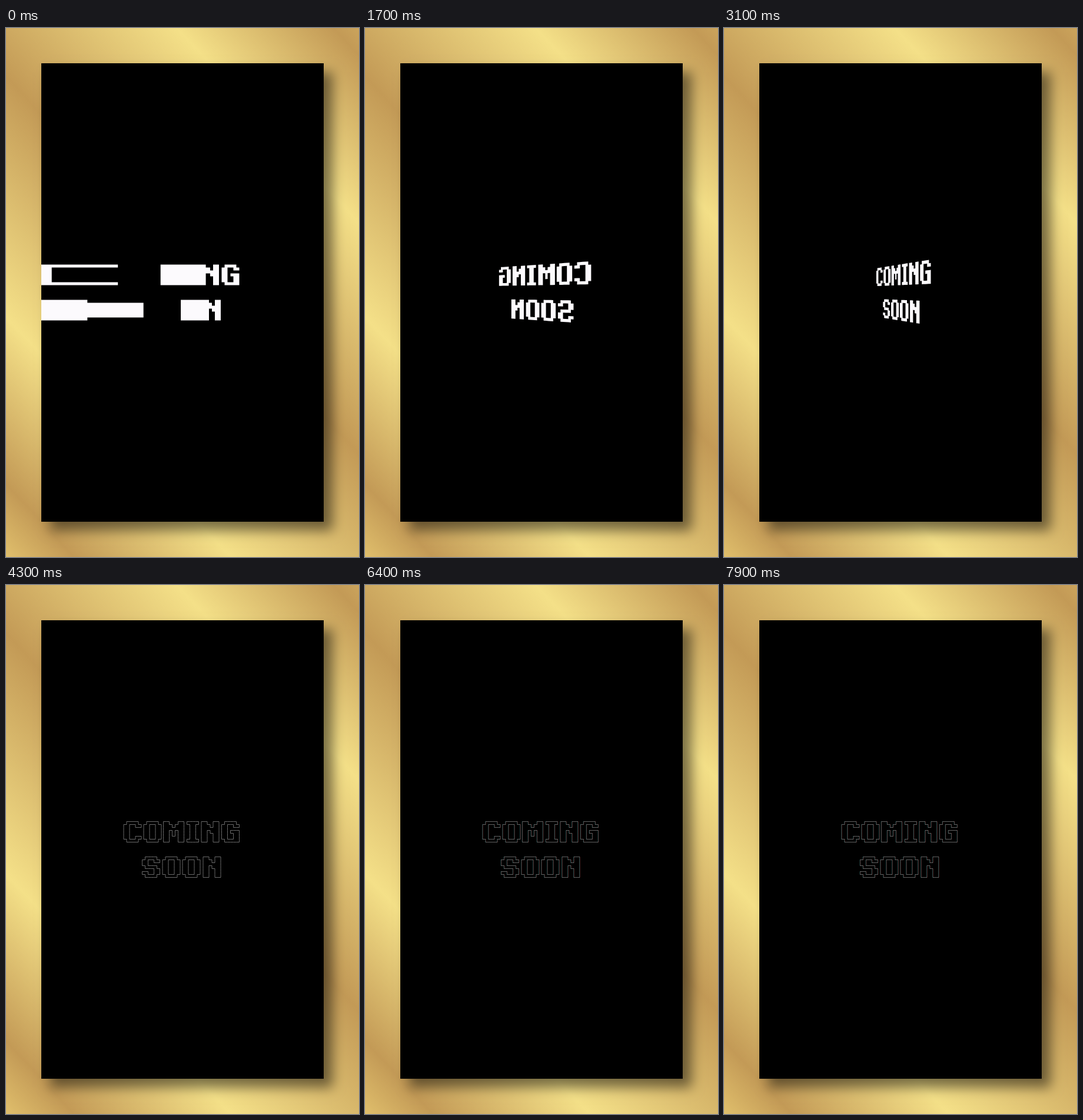
Write an HTML page with a canvas that moves like this. It is 600 by 900 pixels and loops after 8 s.

```html
<!DOCTYPE html>
<html lang="en">
<head>
<meta charset="utf-8">
<title>Coming soon</title>
<style>
  html, body { margin: 0; width: 100%; height: 100%; overflow: hidden; background: #000; }
  canvas { display: block; width: 600px; height: 900px; }
</style>
</head>
<body>
<canvas id="stage" width="600" height="900" role="img" aria-label="COMING SOON"></canvas>
<script>
const ctx = document.getElementById('stage').getContext('2d');
const LOOP = 8000, STEP = 100, CELL = 5;
const CX = 298, CY = 450, DEPTH = 570;
const WHITE = '#fcfafd';

const GLYPHS = {
  C: '.####. ##..## ##.... ##.... ##.... ##..## .####.',
  O: '.####. ##..## ##..## ##..## ##..## ##..## .####.',
  M: '##...## ###.### ####### ##.#.## ##.#.## ##...## ##...##',
  I: '#### .##. .##. .##. .##. .##. ####',
  N: '##..## ###.## ###### ##.### ##..## ##..## ##..##',
  G: '.####. ##..## ##.... ##.### ##..## ##..## .#####',
  S: '.####. ##..## ##.... .####. ....## ##..## .####.'
};
const LINES = [
  { text: 'COMING', y: 402.5, xs: [200, 234, 267.5, 307.5, 332, 366.5] },
  { text: 'SOON', y: 462.5, xs: [231.5, 266, 300, 335] }
];

// Filled cells and the border edges of every letter
const cells = [], edges = [];
for (const line of LINES) {
  [...line.text].forEach((ch, i) => {
    const rows = GLYPHS[ch].split(' ');
    const on = (r, c) => (rows[r] || '')[c] === '#';
    rows.forEach((row, r) => {
      for (let c = 0; c < row.length; c++) {
        if (!on(r, c)) continue;
        const x = line.xs[i] + c * CELL, y = line.y + r * CELL;
        const X = x + CELL, Y = y + CELL;
        cells.push([x, y, X, Y]);
        if (!on(r - 1, c)) edges.push([x, y, X, y]);
        if (!on(r + 1, c)) edges.push([x, Y, X, Y]);
        if (!on(r, c - 1)) edges.push([x, y, x, Y]);
        if (!on(r, c + 1)) edges.push([X, y, X, Y]);
      }
    });
  });
}

const clamp = (v, lo = 0, hi = 1) => Math.min(hi, Math.max(lo, v));
const flat = (x, y) => [x, y];

// Everything left of the edge is dragged off to the left
const smear = edge => (x, y) => [x - 0.19 * Math.max(0, edge - x) ** 2.3, y];

// Turn about the vertical axis with perspective
const turn = deg => {
  const a = deg * Math.PI / 180, cos = Math.cos(a), sin = Math.sin(a);
  return (x, y) => {
    const k = DEPTH / (DEPTH + (x - CX) * sin);
    return [CX + (x - CX) * cos * k, CY + (y - CY) * k];
  };
};

// Pull towards the lower right, lower line bulging to the left
const bend = amount => (x, y) => {
  const pull = 144 * amount * (Math.max(0, x - 330 + y - 402) / 101) ** 5;
  const low = clamp((y - 440) / 25) * amount;
  return [
    x + pull + low * 0.2 * Math.min(0, x - 310),
    y + pull * 0.6 + amount * 20 * clamp((y - 450) / 47)
  ];
};

function fillText(map, color, dx = 0) {
  ctx.fillStyle = color;
  ctx.beginPath();
  for (const [x, y, X, Y] of cells) {
    [[x, y], [X, y], [X, Y], [x, Y]].forEach(([px, py], i) => {
      const [u, v] = map(px, py);
      ctx[i ? 'lineTo' : 'moveTo'](u + dx, v);
    });
    ctx.closePath();
  }
  ctx.fill();
}

function strokeText(map, color, width, dx = 0, dy = 0) {
  ctx.strokeStyle = color;
  ctx.lineWidth = width;
  ctx.beginPath();
  for (const [x, y, X, Y] of edges) {
    const a = map(x, y), b = map(X, Y);
    ctx.moveTo(a[0] + dx, a[1] + dy);
    ctx.lineTo(b[0] + dx, b[1] + dy);
  }
  ctx.stroke();
}

function splitFill(shift) {
  ctx.globalCompositeOperation = 'lighter';
  fillText(flat, '#fc0000', shift);
  fillText(flat, '#00fafd', 0);
}

function splitStroke(map, level, shift) {
  ctx.globalCompositeOperation = 'lighter';
  strokeText(map, `rgb(${level},0,0)`, 0.8, shift);
  strokeText(map, `rgb(0,${level},${level})`, 0.8, -shift);
}

function backdrop() {
  const gold = ctx.createLinearGradient(600, 0, -169, 719);
  const dark = '#c39a56', bright = '#f4e088';
  [[0, '#cba45c'], [0.03, dark], [0.215, bright], [0.47, dark],
   [0.735, bright], [0.92, dark], [1, '#e0bf6c']].forEach(s => gold.addColorStop(...s));
  ctx.fillStyle = gold;
  ctx.fillRect(0, 0, 600, 900);
  ctx.save();
  ctx.shadowColor = 'rgba(0,0,0,.5)';
  ctx.shadowBlur = 20;
  ctx.shadowOffsetX = ctx.shadowOffsetY = 15;
  ctx.fillStyle = '#000';
  ctx.fillRect(60, 60, 480, 780);
  ctx.restore();
}

function bendAmount(t) {
  if (t < 7200) return 0;
  if (t < 7300) return 0.13;
  return clamp(1 - (t - 7300) / 200) ** 2;
}

function scene(t) {
  if (t < 400) fillText(smear(345 - 146 * t / 350), WHITE);
  else if (t < 3400) fillText(turn(142 + (t - 1700) * 0.111), WHITE);
  else if (t < 3600) fillText(smear(345 - 146 * (t - 3400) / 200), WHITE);
  else if (t < 4000) fillText(flat, WHITE);
  else if (t < 5000) strokeText(flat, '#858585', 0.8);
  else if (t < 6400) splitFill(1 + 0.4 * Math.sin((t - 5400) / 90));
  else {
    const amount = bendAmount(t);
    const map = bend(amount);
    if (amount) strokeText(bend(amount * 0.9), 'rgba(110,0,0,.4)', 0.8, -5, 7);
    splitStroke(map, 120 + 60 * amount, 0.2 + 0.4 * amount);
  }
}

function draw(now) {
  const t = Math.floor(now % LOOP / STEP) * STEP;
  backdrop();
  ctx.save();
  ctx.beginPath();
  ctx.rect(60, 60, 480, 525);
  ctx.clip();
  scene(t);
  ctx.restore();
}

const start = performance.now();
function tick() {
  draw(performance.now() - start);
  requestAnimationFrame(tick);
}
tick();
</script>
</body>
</html>
```
